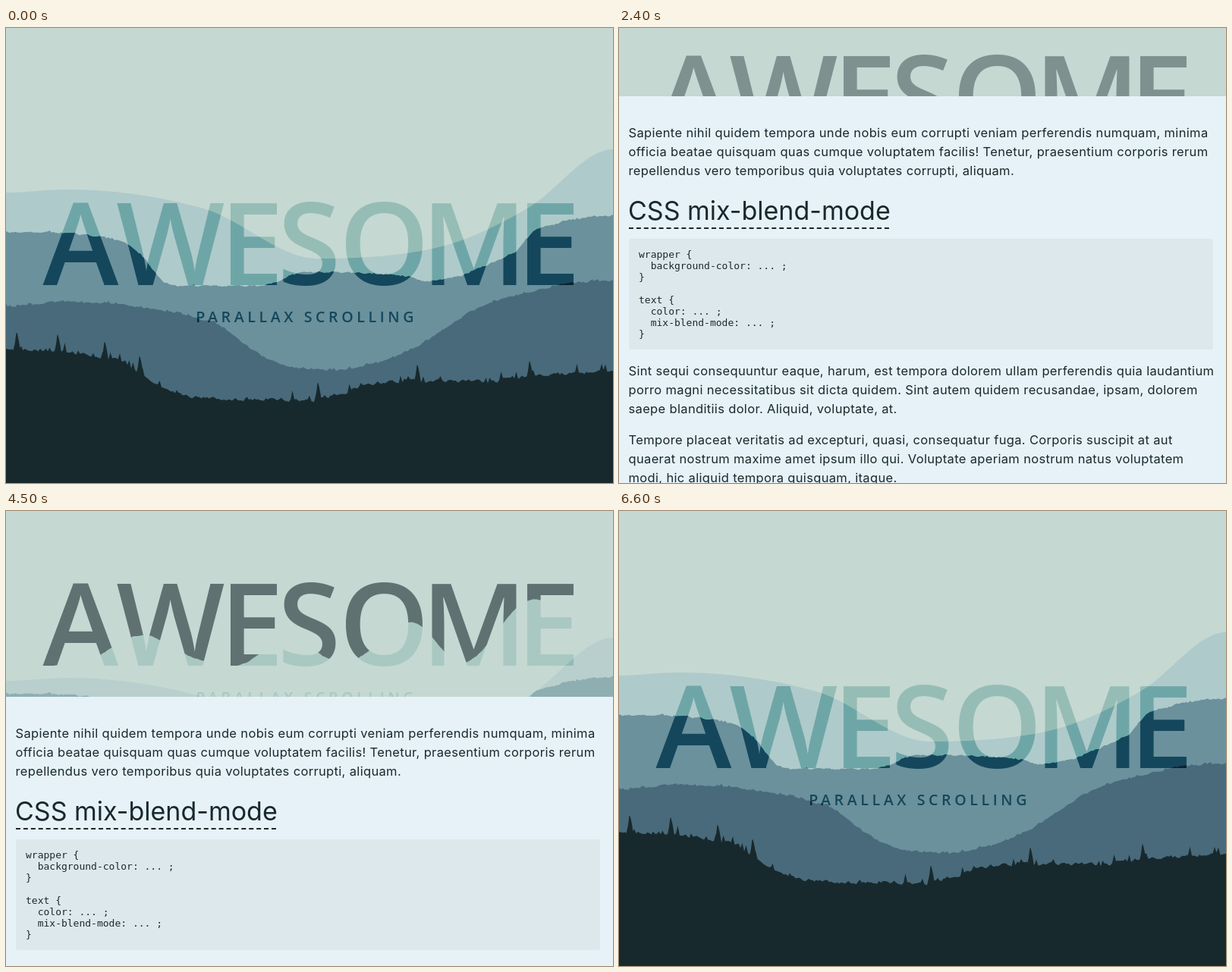
Write an HTML page that moves like this. It is 800x600 px and loops after 7.2 s.

```html
<!DOCTYPE html>
<html lang="en">
<head>
<meta charset="utf-8">
<title>Parallax scrolling</title>
<style>
  html, body { margin: 0; width: 100%; height: 100%; overflow: hidden; background: #c5d8d2; }
  svg { display: block; width: 100%; height: 100%; }
  text { white-space: pre; fill: #18292d; }
  #words { mix-blend-mode: overlay; font-family: "Open Sans", sans-serif; font-weight: 600; }
  .title { font-size: 151px; text-anchor: middle; }
  .sub { font-size: 19.6px; letter-spacing: 4.6px; }
  .copy { font: 16.5px Inter, sans-serif; letter-spacing: .34px; }
  .head { font: 34px Inter, sans-serif; }
  .code { font: 13px "DejaVu Sans Mono", monospace; }
  .foot { font: 16px Inter, sans-serif; fill: #c5d8d2; }
  .link { letter-spacing: .55px; }
</style>
</head>
<body>
<svg viewBox="0 0 800 600" preserveAspectRatio="none">
  <rect width="800" height="600" fill="#c5d8d2"/>
  <g id="hero">
    <g id="hills"></g>
    <g id="words">
      <text class="title" x="98.5 217 324 399.5 498.5 617 715" y="339">AWESOME</text>
      <text class="sub" x="250.3" y="388">PARALLAX SCROLLING</text>
    </g>
  </g>
  <g id="page">
    <rect width="800" height="1300" fill="#e6f2f8"/>
    <g id="copy" class="copy"></g>
    <text class="head" x="12" y="163">CSS mix-blend-mode</text>
    <path d="M13 174H356" stroke="#18292d" stroke-width="2" stroke-dasharray="6 3.91"/>
    <rect x="13" y="188" width="770" height="146" rx="3" fill="#dde8ec"/>
    <g id="code" class="code"></g>
    <rect y="552" width="800" height="700" fill="#18292d"/>
    <text class="foot" x="244" y="604">Copyright © 2019 by</text>
    <text class="foot link" x="405" y="604">@ondrelmavorapu</text>
    <path d="M405 614.5H552" stroke="#c5d8d2" stroke-dasharray="3 2"/>
  </g>
</svg>
<script>
const NS = "http://www.w3.org/2000/svg";
const $ = id => document.getElementById(id);

function add(parent, tag, attrs, text) {
  const el = document.createElementNS(NS, tag);
  for (const k in attrs) el.setAttribute(k, attrs[k]);
  if (text) el.textContent = text;
  return parent.appendChild(el);
}

function random(seed) {
  return () => (seed = (seed * 16807) % 2147483647) / 2147483647;
}

// Smooth curve through "x,y x,y ..." that never overshoots its points.
function curve(str) {
  const pts = str.split(" ").map(p => p.split(",").map(Number));
  const last = pts.length - 1;
  const slope = pts.map(([x, y], i) => {
    const [xa, ya] = pts[Math.max(0, i - 1)], [xb, yb] = pts[Math.min(last, i + 1)];
    return (y - ya) * (yb - y) > 0 ? (yb - ya) / (xb - xa) : 0;
  });
  return x => {
    let i = 0;
    while (i < last - 1 && x > pts[i + 1][0]) i++;
    const [x0, y0] = pts[i], [x1, y1] = pts[i + 1], w = x1 - x0;
    const u = Math.min(1, Math.max(0, (x - x0) / w)), v = 1 - u;
    return y0 + (y1 - y0) * u * u * (3 - 2 * u) + w * u * v * (slope[i] * v - slope[i + 1] * u);
  };
}

// Skyline with a wandering edge and random spikes, closed far below the stage.
function ridge(height, rough, spike, seed) {
  const rnd = random(seed);
  let d = "M-5 900", drift = 0;
  for (let x = -5; x <= 805; x += 2.5) {
    drift = drift * 0.6 + (rnd() - 0.5) * rough;
    const tip = rnd() < 0.2 ? spike * rnd() : 0;
    d += `L${x} ${(height(x) + drift - tip).toFixed(1)}`;
  }
  return d + "L805 900Z";
}

const tree = (x, y) => `M${x - 6} ${y + 8}l3 -12l1 -5l1.5 -12h1l1.5 6l1 5l1 6l2 12Z`;

// From far to near: the first hill has the colour of the sky and only shows under the words.
const layers = [
  { color: "#c5d8d2", rough: 1, spike: 0,
    line: "0,165 110,152 180,121 245,150 300,162 372,127 445,158 535,104 600,158 695,74 800,110" },
  { color: "#afcaca", rough: 0, spike: 0,
    line: "0,217 80,213 260,238 410,304 520,298 600,280 690,236 800,160" },
  { color: "#6a919c", rough: 2, spike: 1.5,
    line: "0,270 90,272 165,288 220,340 330,340 400,322 530,327 556,334 670,296 700,266 800,248" },
  { color: "#486a7b", rough: 2, spike: 3,
    line: "0,367 80,361 265,386 350,439 430,451 500,438 540,421 635,364 800,333" },
  { color: "#18292d", rough: 4, spike: 11,
    line: "0,423 150,440 220,481 400,490 490,468 640,465 800,452",
    trees: [14, 68, 130, 176, 411, 542, 690] }
];

// Each nearer layer rises faster with the scroll; the words come last.
const rate = depth => 0.12 - 0.1 * depth;

layers.forEach((l, i) => {
  const height = curve(l.line);
  let d = ridge(height, l.rough, l.spike, 71 + i * 97);
  for (const x of l.trees || []) d += tree(x, height(x));
  add($("hills"), "path", { d, fill: l.color });
});
const moving = [...$("hills").children, $("words")];

const paragraphs = [
  [54, "Sapiente nihil quidem tempora unde nobis eum corrupti veniam perferendis numquam, minima",
    "officia beatae quisquam quas cumque voluptatem facilis! Tenetur, praesentium corporis rerum",
    "repellendus vero temporibus quia voluptates corrupti, aliquam."],
  [368, "Sint sequi consequuntur eaque, harum, est tempora dolorem ullam perferendis quia laudantium",
    "porro magni necessitatibus sit dicta quidem. Sint autem quidem recusandae, ipsam, dolorem",
    "saepe blanditiis dolor. Aliquid, voluptate, at."],
  [459, "Tempore placeat veritatis ad excepturi, quasi, consequatur fuga. Corporis suscipit at aut",
    "quaerat nostrum maxime amet ipsum illo qui. Voluptate aperiam nostrum natus voluptatem",
    "modi, hic aliquid tempora quisquam, itaque."]
];
for (const [y, ...lines] of paragraphs)
  lines.forEach((s, i) => add($("copy"), "text", { x: 12.5, y: y + i * 25 }, s));

["wrapper {", "  background-color: ... ;", "}", "",
 "text {", "  color: ... ;", "  mix-blend-mode: ... ;", "}"]
  .forEach((s, i) => s && add($("code"), "text", { x: 26, y: 213 + i * 15 }, s));

// Scroll offset over time in ms: down in two goes, back up in two goes.
const LOOP = 7200, TICK = 100;
const scroll = curve("0,0 300,0 800,147 1100,245 1700,368 2000,368 2400,510 2800,643 4000,643 4400,389 5200,219 5300,219 6000,0 7200,0");

const shift = (el, y) => el.setAttribute("transform", `translate(0 ${y.toFixed(2)})`);

function draw(ms) {
  const t = Math.floor((ms % LOOP) / TICK) * TICK;
  const s = Math.round(scroll(t));
  moving.forEach((el, i) => shift(el, rate(i) * s));
  $("hero").setAttribute("opacity", 1 - s / 850);
  shift($("page"), 600 - s);
}

const start = performance.now();
function loop() {
  draw(performance.now() - start);
  requestAnimationFrame(loop);
}
loop();
</script>
</body>
</html>
```
